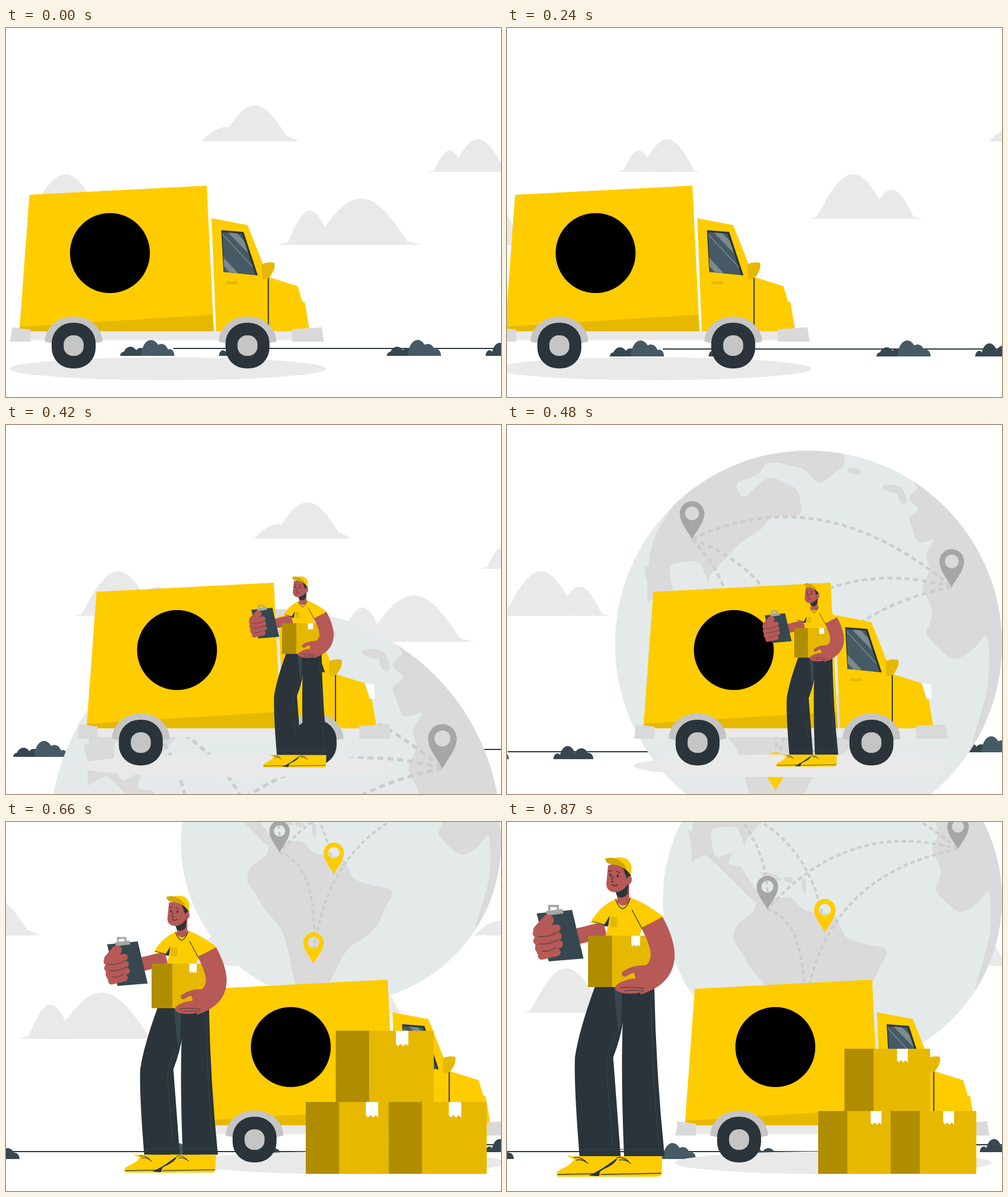
Recreate the animation shown at these times as an HTML page with a canvas. Size 867 px wide and 646 px high, loop 900 ms.

```html
<!DOCTYPE html>
<html lang="en">
<head>
<meta charset="utf-8">
<title>Delivery van</title>
<style>
html, body { margin: 0; width: 100%; height: 100%; overflow: hidden; background: #fff; }
canvas { display: block; }
</style>
</head>
<body>
<canvas id="stage" width="867" height="646"></canvas>
<script>
const ctx = document.getElementById('stage').getContext('2d');
const LOOP = 900, STEP = 30, SPAN = 870;
const YELLOW = '#ffcc00', AMBER = '#e6b800', BROWN = '#b08d00', DARK = '#2a343a',
  SLATE = '#37474f', TEAL = '#455a64', SKIN = '#b65957', PALE = '#e9e9e9',
  LAND = '#dadada', GREY = '#a6a6a6';

// ---- easing ----
const clamp = x => Math.min(1, Math.max(0, x));
function inOutBack(x) {
  const c = 2.595, u = 2 * x;
  return x < .5 ? u * u * ((c + 1) * u - c) / 2
    : ((u - 2) ** 2 * ((c + 1) * (u - 2) + c) + 2) / 2;
}
const inOutQuart = x => x < .5 ? 8 * x ** 4 : 1 - 8 * (1 - x) ** 4;
const outBack = (x, s) => 1 + (s + 1) * (x - 1) ** 3 + s * (x - 1) ** 2;

// ---- drawing helpers ----
function fill(d, color) {
  ctx.fillStyle = color;
  ctx.fill(new Path2D(d), 'evenodd');
}
function line(d, color, width = 1, cap = 'butt') {
  ctx.strokeStyle = color;
  ctx.lineWidth = width;
  ctx.lineCap = cap;
  ctx.stroke(new Path2D(d));
}
function rect(x, y, w, h, color) {
  ctx.fillStyle = color;
  ctx.fillRect(x, y, w, h);
}
function oval(x, y, rx, ry, color, turn = 0) {
  ctx.fillStyle = color;
  ctx.beginPath();
  ctx.ellipse(x, y, rx, ry, turn, 0, 7);
  ctx.fill();
}
function round(x, y, w, h, r, color) {
  ctx.fillStyle = color;
  ctx.beginPath();
  ctx.roundRect(x - w / 2, y - h / 2, w, h, r);
  ctx.fill();
}
// Draws with `scale`, so that point (px, py) lands on (x, y).
function place(x, y, scale, px, py, draw) {
  ctx.save();
  ctx.translate(x, y);
  ctx.scale(scale, scale);
  ctx.translate(-px, -py);
  draw();
  ctx.restore();
}

// ---- sky ----
// A hill is one arch of a cosine.
function hill(base, cx, half, height) {
  ctx.beginPath();
  for (let u = -1; u <= 1.01; u += .04) {
    ctx.lineTo(cx + u * half, base - height * Math.cos(u * Math.PI / 2));
  }
  ctx.fillStyle = PALE;
  ctx.fill();
}
function cloud(base, ...hills) {
  hills.forEach(h => hill(base, ...h));
}
function cloudRow() {
  cloud(198.5, [436, 61, 63], [385, 43, 25], [470, 43, 14]);
  cloud(251.5, [827, 48, 57], [777, 28, 37], [811, 73, 12]);
  cloud(379.5, [622, 85, 81], [532, 40, 60], [601.5, 126.5, 20]);
  cloud(334, [104, 65, 78], [172, 40, 51], [126.5, 100, 14]);
}
function drawClouds(p) {
  for (const start of [0, 1048, 1980]) place(start - 1980 * p, 0, 1, 0, 0, cloudRow);
}

// ---- ground ----
function bump(x, y, rx, h, color) {
  ctx.fillStyle = color;
  ctx.beginPath();
  ctx.ellipse(x, y, rx, h, 0, Math.PI, 2 * Math.PI);
  ctx.fill();
}
function bigBush(x, y) {
  bump(x + 6, y, 6, 7, SLATE);
  bump(x + 18, y, 13, 16, SLATE);
  bump(x + 36, y, 11, 14, SLATE);
  bump(x + 54, y, 17, 28, TEAL);
  bump(x + 72, y, 14, 21, TEAL);
  bump(x + 87, y, 8, 12, TEAL);
}
function smallBush(x, y) {
  bump(x + 7, y, 7, 10, SLATE);
  bump(x + 25, y, 14, 23, SLATE);
  bump(x + 49, y, 14, 19, SLATE);
  bump(x + 62, y, 8, 11, SLATE);
}
function drawGround(p) {
  const x = -431 * p, y = Math.round(574 + 16 * p);
  for (const [dx, dy] of [[886, -12], [0, 0]]) {
    const left = x + dx, base = y + dy;
    rect(left + 293, base - 14, 790, 2, DARK);
    for (const gap of [0, 467]) {
      bigBush(left + 200 + gap, base);
      smallBush(left + 373 + gap, base);
    }
  }
}

// ---- globe ----
// A coast passes smoothly by a few capes, with seeded bays in between.
function coast(seed, rough, ...capes) {
  const random = () => (seed = seed * 16807 % 2147483647) / 2147483647 - .5;
  const mid = (a, b) => [(a[0] + b[0]) / 2, (a[1] + b[1]) / 2];
  const points = capes.flatMap((a, i) => {
    const m = mid(a, capes[(i + 1) % capes.length]);
    return [a, m.map(v => v + rough * random())];
  });
  ctx.beginPath();
  points.forEach((q, i) => {
    ctx.quadraticCurveTo(...q, ...mid(q, points[(i + 1) % points.length]));
  });
  ctx.fillStyle = LAND;
  ctx.fill();
}
function northLand() {
  coast(11, 8, [246, 310], [254, 200], [330, 90], [466, 45], [442, 88], [400, 102], [415, 130],
    [462, 88], [510, 112], [518, 158], [462, 160], [442, 186], [404, 210], [358, 260],
    [355, 285], [338, 238], [284, 244], [284, 290]);
  coast(5, 8, [400, 20], [575, 25], [594, 70], [548, 106], [520, 76], [470, 64], [405, 78]);
  oval(608, 81, 12, 6, LAND, .2);
  oval(676, 112, 19, 7, LAND, .2);
  oval(692, 126, 7, 13, LAND, -.3);
  coast(7, 8, [700, 70], [722, 112], [702, 130], [722, 148], [702, 162], [718, 208], [750, 198],
    [733, 225], [742, 252], [725, 285], [746, 325], [731, 365], [780, 412], [815, 395],
    [842, 362], [842, 465], [806, 590], [900, 560], [900, 150]);
}
function southLand() {
  coast(3, 4, [318, 15], [326, 48], [350, 58], [388, 95], [432, 140], [456, 138], [426, 105],
    [408, 76], [388, 74], [397, 52], [366, 66], [355, 20]);
  coast(9, 6, [396, 208], [404, 178], [430, 160], [436, 138], [500, 132], [522, 156], [574, 160],
    [594, 205], [672, 222], [636, 295], [580, 332], [540, 410], [490, 425], [464, 300], [424, 252]);
  oval(462, 95, 20, 5, LAND, .3);
  oval(493, 101, 9, 5, LAND, .3);
  oval(520, 111, 4, 15, LAND, -.1);
}
function pin(x, y, color) {
  place(x, y, 1, 0, 0, () => fill(
    'M0 0C-9-16-21.5-29-21.5-45A21.5 21.5 0 0 1 21.5-45C21.5-29 9-16 0 0Z' +
    'M-12-45a12 12 0 1 0 24 0a12 12 0 1 0-24 0Z', color));
}
function drawRoutes() {
  const west = [324, 200], east = [779, 284], isles = [398, 404], sea = [513, 450], south = [470, 640];
  const route = (a, bend, b) => line(`M${a}Q${bend} ${b}`, '#cdcdcd', 5);
  ctx.setLineDash([9, 6]);
  route(west, [550, 92], east);
  route(west, [490, 260], sea);
  route(west, [405, 285], isles);
  route(east, [560, 222], isles);
  route(east, [490, 341], south);
  route(isles, [484, 430], south);
  ctx.setLineDash([]);
  [west, east, isles].forEach(p => pin(...p, GREY));
  [sea, south].forEach(p => pin(...p, YELLOW));
}
function drawGlobe(e) {
  const r = 463 - 166 * e, x = 867 - r, y = 1120 - 985 * e;
  ctx.save();
  oval(x, y, r, r, '#e4eaea');
  ctx.clip();
  place(x, y, r / 339, 528, 384, northLand);
  place(x, y, r / 297, 570, 135, southLand);
  ctx.restore();
  place(x, y, r / 339, 528, 384, drawRoutes);
}

// ---- van ----
function wheel(x) {
  fill(`M${x - 50.5} 549A50.5 44 0 0 1 ${x + 50.5} 549L${x + 36} 552H${x - 36}Z`, '#c5c5c5');
  round(x, 556, 77, 80, 36, DARK);
  round(x, 556, 35, 36, 16, '#c5c5c5');
}
function drawWindow() {
  const glass = 'M379 357.5L413 360L437 432L382 427Z';
  fill('M377 354L416 357L441 433L381 427Z', DARK);
  ctx.save();
  fill(glass, TEAL);
  ctx.clip(new Path2D(glass));
  line('M376 404L404 434M392 354L428 391', '#7c8a90', 10);
  line('M378 360L434 420', '#7c8a90', 1.5);
  ctx.restore();
}
function drawVan() {
  oval(283.5, 596.5, 277, 20, PALE);
  rect(40, 531, 470, 15.5, PALE);
  fill('M41 292L351.500 276L364 531H24V523Z', YELLOW);
  fill('M24 523L362 502L364 531H24Z', AMBER);
  fill('M360 333L423 345L449 411L460 436L511 452L519 479H523L532 531H368Z', YELLOW);
  fill('M511 452L527 454L529 478L521 480Z', '#fff');
  drawWindow();
  rect(385, 443.5, 21, 5, AMBER);
  rect(458.5, 437, 2, 85, DARK);
  fill('M449 413Q458 409 470 411Q473 422 461 437Q455 441 450 440Q446 426 449 413Z', AMBER);
  fill('M11 524L43 528V549H7Z', '#d9d9d9');
  fill('M501 527L553 524L557 549H501Z', '#d9d9d9');
  wheel(118.5);
  wheel(423);
  oval(182, 394, 70, 70, '#000');
}

// ---- courier ----
function shoe(x) {
  fill(`M${x + 17} 585h93l-1 29q-1 7-9 7h-99q-4-8 6-13q19-8 24-18Z`, YELLOW);
  line(`M${x + 2} 617L${x + 108} 615`, DARK, 1.3);
  for (const k of [0, 1]) line(`M${x + 30 + 4 * k} ${588 + 4 * k}q11-3 21 6`, DARK, 1.3);
}
function legs() {
  fill('M154 288H204Q212 345 186 412L199 585H127Q117 460 119 412Q126 365 154 288Z', DARK);
  fill('M187 288H202L200 352L195 369Z', SLATE);
  fill('M200 290H258Q261 440 276 585H205Q199 440 203 340Z', DARK);
  line('M192 372Q174 400 174 430L185 565M252 302Q254 440 266 570M128 573H275', SLATE, 1.2);
  shoe(87);
  fill('M198 584L200 591L160 620L143 619Q165 610 198 584Z', DARK);
  shoe(162);
}
function head() {
  fill('M193 108L214 96V140Q203 152 193 140Z', SKIN);
  fill('M190 122Q205 121 213 107L211 126Q203 136 193 130Z', DARK);
  fill('M177 76Q206 66 212 86L211 106Q205 121 191 123Q174 123 174 108Z', SKIN);
  fill('M203 80L217 82V94L212 106Z', DARK);
  oval(214, 102, 4.5, 7.5, SKIN, .2);
  line('M186 94L183 104L188 105M178 87L184 84M191 86L198 89M183 109Q189 114 194 109', DARK, 1.2);
  for (const x of [181, 194]) oval(x, 75 + x / 10, 1.6, 2.6, DARK);
  fill('M185 65C196 59 218 60 218 82L217 94Q208 77 184 73Z', YELLOW);
  fill('M172 64Q195 57 211 82Q198 76 178 73Q172 69 172 64Z', '#d1a800');
}
function clipboardHand() {
  fill('M52 160L114 154L134 239L73 244Z', SLATE);
  line('M74 155V147H89V155', GREY, 4);
  fill('M68 156L97 152L99 160L70 164Z', GREY);
  line('M56 190L72 172', SKIN, 20, 'round');
  fill('M47 185H76L70 236Q54 240 50 222Z', SKIN);
  for (let i = 0; i < 4; i++) {
    const y = 195 + 13 * i, x = 52 + i * i, tip = 87 + 2 * (i % 3);
    line(`M${x} ${y}L${tip} ${y - 9 + i}`, SKIN, 14, 'round');
    if (i) line(`M${x} ${y - 8}Q72 ${y - 5} ${tip} ${y - 15}`, DARK, .9);
  }
}
function parcelArm() {
  line('M254 176C276 217 290 262 228 282', SKIN, 42);
  oval(224, 287, 35, 13, SKIN, -.12);
  line('M206 266Q222 254 250 256', SKIN, 10, 'round');
  for (const k of [0, 1]) line(`M${198 + 8 * k} ${290 + 6 * k}Q220 ${288 + 5 * k} 240 ${291 + 5 * k}`, DARK, .9);
}
function drawCourier() {
  legs();
  line('M116 202L172 188', SKIN, 28);
  fill('M192 134Q203 153 214 132Q239 139 274 166L236 186L232 202H172L178 180L146 176Q163 146 192 134Z', YELLOW);
  head();
  line('M190 135Q203 169 216 133', DARK, 1.4);
  rect(181, 166, 13, 18, AMBER);
  fill('M180 164L169 182L177 183Z', DARK);
  line('M150 174L171 180M219 154L236 186L271 168', DARK, 1.3);
  rect(142, 199, 42.5, 90, BROWN);
  fill('M184 199H252L260 216L248 256L215 289H184Z', AMBER);
  label(218, 199, .8);
  parcelArm();
  clipboardHand();
}

// ---- parcels ----
function label(x, y, scale = 1) {
  place(x, y, scale, 0, 0, () => fill('M0 0h19v24l-4-4l-4 4l-4-4l-4 4l-3-4Z', '#fff'));
}
function parcel(x, y, width, tag) {
  rect(x, y, width, 110, AMBER);
  rect(x, y, 51, 110, BROWN);
  label(tag, y);
}
function drawParcels() {
  parcel(591, 397, 150, 683);
  parcel(545, 506, 127, 637);
  parcel(672, 506, 150, 764);
}

function render(t) {
  const p = t / SPAN, e = inOutBack(p);
  rect(0, 0, 867, 646, '#fff');
  drawClouds(p);
  drawGround(inOutQuart(p));
  drawGlobe(e);
  place(288 * e, 0, 1, 0, 0, drawVan);
  if (t >= 420) {
    const rest = 1 - inOutBack((t - 420) / 450);
    place(195 + 320 * rest, 621 - 21.7 * rest, 1 - .402 * rest, 195, 621, drawCourier);
  }
  const grow = outBack(clamp((t - 551) / 319), 2.9);
  if (t > 551) place(683.5, 616, grow, 683.5, 616, drawParcels);
}

const begin = performance.now();
function tick() {
  const t = (performance.now() - begin) % LOOP;
  render(Math.floor(t / STEP) * STEP);
  requestAnimationFrame(tick);
}
tick();
</script>
</body>
</html>
```
